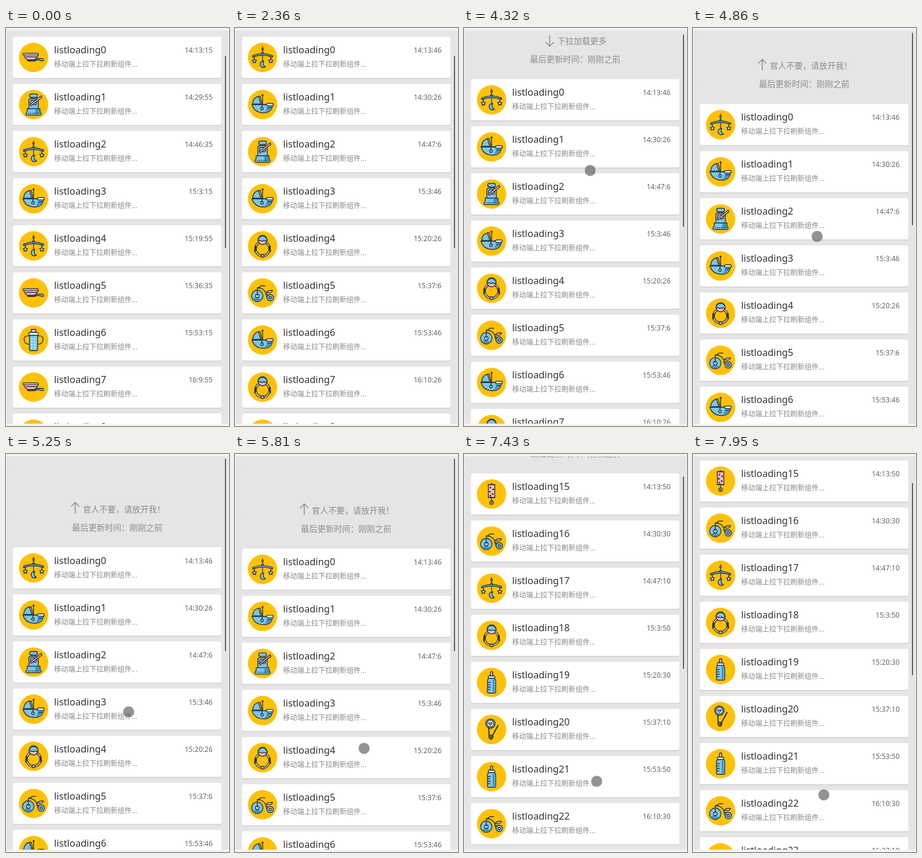
Write an HTML page that moves like this. It is 380x676 px and loops after 8000 ms.

```html
<!DOCTYPE html>
<html lang="zh">
<head>
<meta charset="utf-8">
<style>
html, body { margin: 0; height: 100%; overflow: hidden; background: #f3f3f3; }
svg { display: block; }
text { font-family: "Noto Sans", "Noto Sans CJK SC", sans-serif; white-space: pre; }
.title { font-size: 16.3px; fill: #333; }
.time { font-size: 12px; fill: #666; text-anchor: end; }
.note { font: 12px "Noto Sans CJK SC", "Noto Sans CJK", sans-serif; fill: #888; }
#head text { font: 14px "Noto Sans CJK SC", "Noto Sans CJK", sans-serif; fill: #8c8c8c; }
#head path { fill: none; stroke: #8c8c8c; stroke-width: 1.5; }
.icon { fill: #79c6ea; stroke: #263445; stroke-width: 1.4; stroke-linejoin: round; stroke-linecap: round; }
.n { fill: none; }
.p { fill: #f7b5c4; }
.w { fill: #fff; }
.d { fill: #263445; }
.s { fill: #3d93c4; stroke: none; }
</style>
</head>
<body>
<svg width="380" height="676" viewBox="0 0 380 676">
  <clipPath id="view"><rect x="1" y="4" width="378" height="668" rx="3"/></clipPath>
  <g clip-path="url(#view)">
    <rect width="380" height="676" fill="#e5e5e5"/>
    <g id="scroll">
      <g id="head">
        <path id="arrow" d="M0 -9.5V9M-7 2L0 9L7 2"/>
        <g id="spinner"></g>
        <text id="status" y="-45"></text>
        <text x="112.5" y="-14">最后更新时间：刚刚之前</text>
      </g>
      <g id="list"></g>
    </g>
    <rect id="bar" x="372.5" width="3" height="328" rx="1.5" fill="#5c5c5c" stroke="#fff" stroke-opacity=".8"/>
    <circle id="dot" r="9.7" fill="#606060" fill-opacity=".68" stroke="#fff" stroke-opacity=".5"/>
  </g>
</svg>
<script>
const $ = id => document.getElementById(id);
const path = (d, c = '') => `<path class="${c}" d="${d}"/>`;
const rect = (x, y, w, h, r = 0, c = '') => `<rect x="${x}" y="${y}" width="${w}" height="${h}" rx="${r}" class="${c}"/>`;
const ring = (x, y, r, c = '') => `<circle cx="${x}" cy="${y}" r="${r}" class="${c}"/>`;
const star = x => path(`M${x} 2l1.1 2.4 2.6.3-1.9 1.8.5 2.6-2.3-1.3-2.3 1.3.5-2.6-1.9-1.8 2.6-.3z`, 'w');

// Each icon is centred on its yellow disc.
const icons = {
  pan: path('M-17 -5Q-14 4 -9 4H1Q6 2 8 -5z', 'p') + path('M-13 -1H5', 'n') + rect(-18, -7, 26, 2.6, 1, 'w')
    + path('M-10 5H1L5 2H13Q18 2 17 5Q16 7 12 5L6 4L2 6H-10z'),
  seat: rect(-6.5, -18, 13, 6, 2.5) + path('M-3 -12V-9M3 -12V-9', 'n') + path('M-8 8V-7Q-8 -10 -5 -10H5Q8 -10 8 -7V8z')
    + rect(-5, -7, 10, 7, 2, 'p') + path('M-11 7H11Q10 12 13 15Q13 18 9 18H-10Q-14 18 -13 15Q-10 12 -11 7z')
    + path('M3 8H10Q9 12 12 16H3z', 's') + path('M-9 15H9', 'n" stroke-dasharray="1 2.6')
    + path('M13 -15L-6 0L-4 2L14 -12z', 'p'),
  mobile: path('M0 -18V7M-14 -3V3M14 -3V3', 'n') + ring(0, -14, 1.5, 'w') + ring(0, -7, 1.8, 'p')
    + path('M-17 -3Q0 -10 17 -3V-.5Q0 -7 -17 -.5z') + star(-14) + star(14)
    + path('M2 6Q-5 7 -4 13Q-2 19 5 16Q-1 14 2 6z'),
  pram: path('M-17 -1Q-16 -12 -7 -14L-3 -1z') + path('M-7 -14L-4 -14L-1 -1M0 -1V-16', 'n') + ring(0, -16, 1, 'd')
    + path('M-18 0H17Q16 14 2 14Q-14 14 -18 0z') + path('M7 4H15Q12 12 3 13Q8 9 7 4z', 's')
    + path('M-18 0H18', 'n') + rect(7, -2, 11, 4, 1, 'w') + path('M-1 1V5', 'n') + ring(-1, 7, 2.2, 'p') + path('M9 5H15', 'n'),
  cup: path('M-8 -7Q-17 -8 -16 0Q-15 7 -8 7M8 -7Q17 -8 16 0Q15 7 8 7', 'n') + path('M-4 -13V-18H4V-13z', 'p')
    + rect(-8, -13, 16, 5, 2, 'w') + path('M-7 -8H7V16Q7 18 5 18H-5Q-7 18 -7 16z')
    + '<path d="M-3 -3V15M2 -3V15" stroke="#fff" stroke-dasharray="2 3"/>',
  ring: ring(0, 5, 12, 'n" stroke-width="4') + '<circle cy="5" r="12" fill="none" stroke="#ffe3a0" stroke-width="1.5"/>'
    + path('M-12 1L-13 9M12 1L13 9', 'n" stroke-width="3') + ring(0, -10, 7.7, 'p') + path('M-7.7 -9A7.7 7.7 0 0 1 7.7 -9L5 -8L2 -9L-1 -8L-4 -9z')
    + ring(0, 17, 2.5, 'p'),
  bike: ring(-9, 5, 9.7) + path('M-9 5L-3 12A9 9 0 0 1 -16 11z', 's') + ring(-9, 5, 3, 'w') + ring(13, 8, 5.5) + ring(13, 8, 2, 'p')
    + path('M-9 5V-9Q6 -8 7 7M-9 -9L-4 -9M-3 -12H4M-8 -8L-3 -12', 'n') + path('M6 -1Q10 -5 17 -4Q15 0 11 0z', 'p') + path('M5 3H9', 'n'),
  rattle: rect(-5.5, -16, 11, 22, 1, 'p') + path('M-6 -16H6M-6 6H6M0 -18V-16M0 6V12', 'n')
    + [[-2, -11], [3, -8], [-3, -4], [2, 0], [-2, 3]].map(([x, y]) => ring(x, y, .8, 'd')).join('') + ring(0, 14.5, 3, 'w') + ring(0, 14.5, .8, 'd'),
  bottle: path('M-3 -11Q-1 -13 -2 -17Q0 -20 2 -17Q1 -13 3 -11z', 'p') + rect(-5.5, -11, 11, 4, 1, 'w')
    + path('M-5 -7H5L7 -4V16Q7 18 5 18H-5Q-7 18 -7 16V-4z') + path('M2 -5H5V16H2z', 's') + path('M-6 0H-2M-6 4H-3M-6 8H-2M-6 12H-3', 'n'),
  pin: path('M-5 -6L-4 13M-1 15L11 -7', 'n" stroke-width="2') + ring(-1, 13, 3.5, 'n') + ring(-1, 13, 1, 'w')
    + ring(-2, -10, 8) + ring(-2, -10, 5.8, 'w') + path('M-2 -7L-5 -10Q-5 -13 -2 -11Q1 -13 1 -10z', 'p')
};

// Page states: when shown, first row number, seconds past 14:13, icon order.
const pages = [
  [0, 0, 15, 'pan seat mobile pram mobile pan cup pan pan'],
  [2360, 0, 46, 'mobile pram seat pram ring bike pram ring bike'],
  [6600, 15, 50, 'rattle bike mobile ring bottle pin bottle bike pan']
];
const clock = s => [s / 3600, s / 60 % 60, s % 60].map(Math.floor).join(':');
const row = (name, i, first, sec) => `<g transform="translate(0 ${15 + i * 80})">
  <rect x="12" y="1.2" width="355" height="70" rx="3" fill="#cbcbcb"/>
  <rect x="12" width="355" height="70" rx="3" fill="#fff"/>
  <circle cx="47" cy="35" r="25" fill="#ffc107"/>
  <g class="icon" transform="translate(47 35)">${icons[name]}</g>
  <text class="title" x="82" y="28">listloading${first + i}</text>
  <text class="note" x="82" y="51">移动端上拉下拉刷新组件...</text>
  <text class="time" x="352" y="27">${clock(14 * 3600 + 13 * 60 + sec + i * 1000)}</text></g>`;

const offsets = [[3950, 0], [4050, 14], [4184, 44], [4319, 72], [4453, 85], [5260, 143.5], [5798, 146],
  [5933, 104], [6067, 82], [6202, 78], [7143, 78], [7278, 60], [7412, 18], [7547, 2], [7681, -4]];
const leaving = [[150, 165, 338], [418, 54, 186]];
const touch = [[2750, 44, 43], [3500, 216, 231], [3903, 216, 171], [4050, 216, 184], [4184, 215, 214],
  [4319, 215, 242], [5260, 209, 438], [5798, 220, 500], [6740, 230, 527], [7950, 223, 579]];

function at(keys, t, n = 1) {
  const i = keys.findIndex(k => k[0] > t);
  if (i < 0) return keys.at(-1)[n];
  if (!i) return keys[0][n];
  const a = keys[i - 1], b = keys[i];
  return a[n] + (b[n] - a[n]) * (t - a[0]) / (b[0] - a[0]);
}

$('spinner').innerHTML = Array.from({ length: 12 }, (_, i) =>
  `<line y1="-4.8" y2="-8.5" stroke="#8c8c8c" stroke-width="2" stroke-linecap="round" opacity="${.3 + i * .05}" transform="rotate(${i * 30})"/>`).join('');

const STEP = 134.5;
let shown;

function draw(now) {
  const t = now % 8000;
  const beat = Math.floor((t - 4038) / STEP), held = 4050 + STEP * beat;

  const page = pages.findLast(p => t >= p[0]);
  if (page !== shown) {
    shown = page;
    const [, first, sec, names] = page;
    $('list').innerHTML = names.split(' ').map((name, i) => row(name, i, first, sec)).join('');
  }

  const off = at(offsets, held);
  $('scroll').setAttribute('transform', `translate(0 ${off})`);
  $('bar').setAttribute('y', 8 + Math.max(0, (78 - off) / 2) - .5);

  const loading = t >= 5925, release = t >= 4700 && !loading;
  $('status').textContent = loading ? '正在加载更多' : release ? '官人不要，请放开我！' : '下拉加载更多';
  $('status').setAttribute('x', release ? 131 : 159);
  $('arrow').setAttribute('visibility', loading ? 'hidden' : 'visible');
  $('arrow').setAttribute('transform', release ? 'translate(118 -52) rotate(180)' : 'translate(146 -50)');
  $('spinner').setAttribute('visibility', loading ? 'visible' : 'hidden');
  $('spinner').setAttribute('transform', `translate(146 -50) rotate(${beat * 60})`);

  const path = t < 2610 ? leaving : touch;
  $('dot').setAttribute('visibility', t >= 120 && t < 540 || t >= 2610 ? 'visible' : 'hidden');
  $('dot').setAttribute('transform', `translate(${at(path, held)} ${at(path, held, 2)})`);
}

function loop() {
  draw(performance.now());
  requestAnimationFrame(loop);
}
loop();
</script>
</body>
</html>
```
